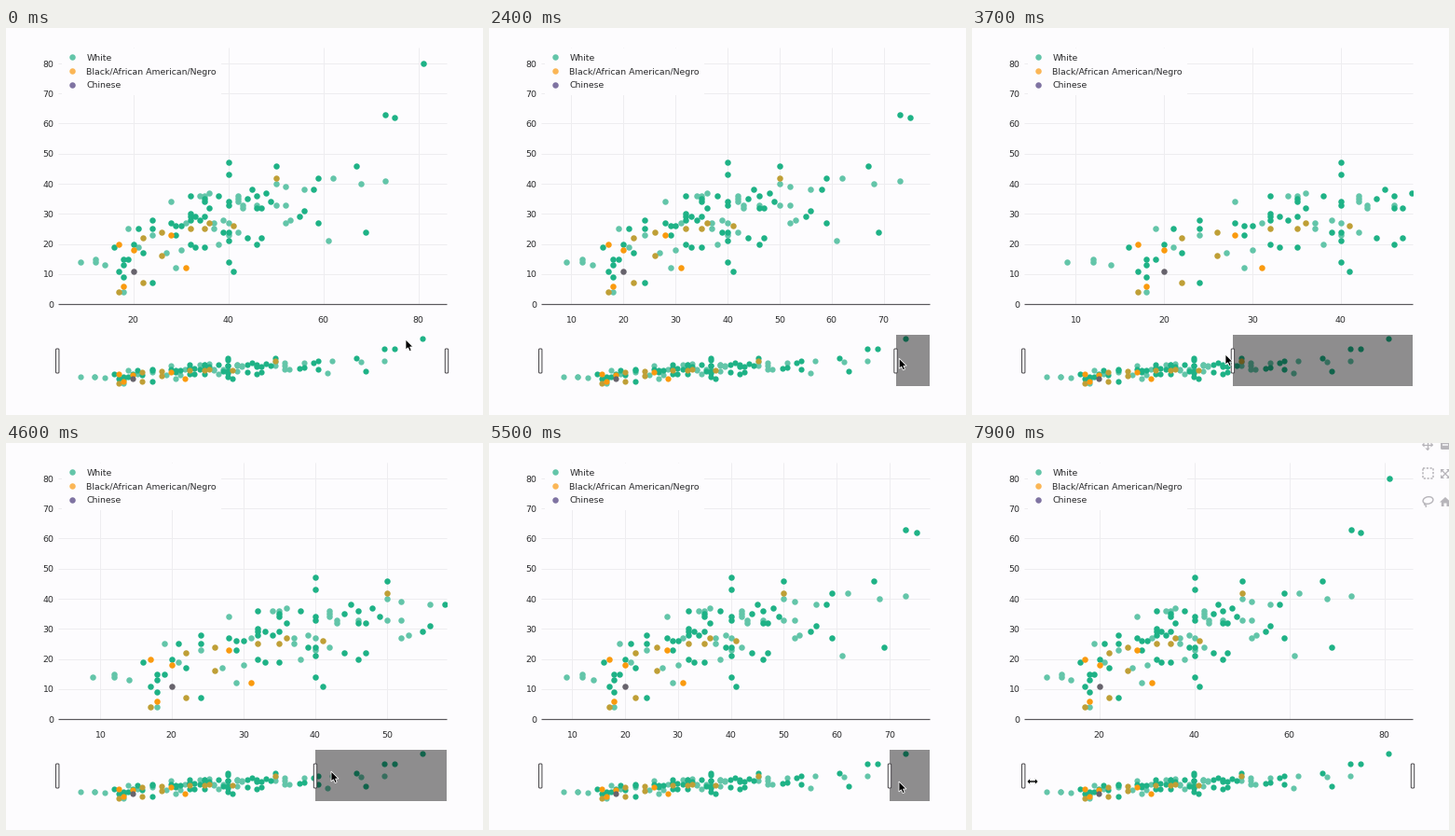
Animation of 512x415 px, one loop 8000 ms. Source, as a matplotlib script:

```python
import numpy as np
import matplotlib.pyplot as plt
from matplotlib.animation import FuncAnimation
from matplotlib.collections import LineCollection
from matplotlib.patches import Ellipse, FancyBboxPatch, Polygon, Rectangle

WIDTH, HEIGHT, DPI = 512, 415, 100
PX = 72 / DPI
FRAMES, STEP_MS = 80, 100
LEFT, RIGHT, TOP, BASE = 56, 473, 21, 296
X_MIN, UNIT_X, UNIT_Y = 4.2, 5.1, 3.225
INK = "#2b2b2d"
PAPER = "#fdfcfe"
LIGHT, DEEP, ORANGE, OLIVE, GREY = "#63c5a9", "#1eb286", "#fa9a0e", "#bf9f36", "#67636c"

# x value -> y values
light = {
    9: [14], 12: [14, 15], 14: [13], 18: [4], 19: [25], 21: [19], 24: [23],
    27: [17], 28: [34], 29: [12], 30: [18], 31: [27], 34: [36], 35: [36],
    36: [37], 37: [25, 27], 38: [20], 39: [28], 40: [27, 23],
    42: [36, 35, 34, 24], 43: [33, 32], 46: [33], 50: [40, 33],
    52: [39, 33, 27], 53: [28], 56: [38], 61: [21], 62: [42], 68: [40], 73: [41],
}
deep_low = {
    16: [19], 17: [11], 18: [15, 13, 9], 19: [15], 20: [20], 21: [25], 22: [17],
    24: [28, 25, 7], 28: [27], 29: [26, 23], 30: [26], 32: [36, 30, 29, 28, 20],
    33: [29, 19], 34: [28], 35: [35, 34, 29, 19], 36: [32], 38: [36], 39: [24],
}
deep_high = {
    40: [47, 43, 34, 33, 24, 21, 14], 41: [11], 44: [35, 22], 45: [38],
    46: [36, 32, 20], 47: [32, 22], 48: [37], 49: [34], 50: [46], 55: [29],
    56: [31], 58: [38], 59: [42, 27], 67: [46], 69: [24], 73: [63], 75: [62], 81: [80],
}
orange = {17: [20], 18: [6], 20: [18], 28: [23], 31: [12]}
olive = {17: [4], 22: [22, 7], 26: [24, 16], 32: [25], 35: [25], 36: [27], 41: [26], 50: [42]}
grey = {20: [11]}


def flatten(groups):
    return np.array([(x, y) for x, ys in groups.items() for y in ys], float)


layers = [(light, LIGHT), (deep_low, DEEP), (deep_high, DEEP),
          (olive, OLIVE), (orange, ORANGE), (grey, GREY)]
layers = [(flatten(groups), color) for groups, color in layers]

fig = plt.figure(figsize=(WIDTH / DPI, HEIGHT / DPI), dpi=DPI, facecolor=PAPER)
ax = fig.add_axes([0, 0, 1, 1])
ax.set_xlim(0, WIDTH)
ax.set_ylim(HEIGHT, 0)
ax.axis("off")


def line(xs, ys, color, width=1, z=1):
    return ax.plot(xs, ys, color=color, lw=width * PX, zorder=z, solid_capstyle="butt")[0]


def label(x, y, text, align, size=9.4):
    return ax.text(x, y, text, ha=align, va="center_baseline", color=INK,
                   fontsize=size * PX, family="DejaVu Sans", zorder=8)


def dots(points, color, diameter=6.5, z=4):
    return ax.scatter(points[:, 0], points[:, 1], s=(diameter * PX) ** 2,
                      c=color, linewidths=0, zorder=z)


# Static chart parts
for value in range(0, 90, 10):
    y = BASE - value * UNIT_Y
    label(51, y, str(value), "right")
    if value:
        line([LEFT, RIGHT], [y, y], "#eeedf0")
line([LEFT, RIGHT], [BASE + .3] * 2, "#5a585c", 1.2, 5)
line([0, WIDTH], [414.5] * 2, "#a3a2a4")

ax.add_patch(Rectangle((60, 22), 171, 50, fc=PAPER, ec="none", zorder=2))
legend = [("White", LIGHT), ("Black/African American/Negro", "#fbb656"), ("Chinese", "#7f73a2")]
for row, (name, color) in enumerate(legend):
    y = 31.3 + 14.7 * row
    dots(np.array([[71, y]]), color, 6.5, 7)
    label(86.5, y, name, "left")

# Scatter layers and their overview copies
plot_area = Rectangle((LEFT, TOP), RIGHT - LEFT, BASE - TOP + 4, transform=ax.transData)
main_dots = []
for points, color in layers:
    main = dots(points, color)
    main.set_clip_path(plot_area)
    main_dots.append(main)
    overview = np.column_stack([LEFT + (points[:, 0] - X_MIN) * UNIT_X - .4,
                                383 - .622 * points[:, 1]])
    dots(overview, color, 6.2)

grid = LineCollection([], colors="#eeedf0", linewidths=PX, zorder=1)
ax.add_collection(grid)
tick_labels = [label(0, 312, "", "center") for _ in range(20)]

mask = Rectangle((RIGHT, 329), 0, 55, fc="black", ec="none", alpha=.44, zorder=5)
ax.add_patch(mask)


def make_handle(center):
    handle = FancyBboxPatch((center - 1.7, 344), 3.4, 26, boxstyle="round,pad=0,rounding_size=1",
                            fc="white", ec="#48464a", lw=PX, zorder=6)
    ax.add_patch(handle)
    return handle


make_handle(55.2)
right_handle = make_handle(RIGHT)

# Toolbar icons
ICON = "#b7b5ba"
toolbar = []


def icon_line(xs, ys, width=1.3, style="-"):
    artist = line(xs, ys, ICON, width, 7)
    artist.set_linestyle(style)
    toolbar.append(artist)


def icon_patch(patch):
    patch.set_zorder(7)
    ax.add_patch(patch)
    toolbar.append(patch)


def arrow_head(x, y, dx, dy, size=2.6):
    tip = (x + dx * size, y + dy * size)
    icon_patch(Polygon([tip, (x - dy * size, y + dx * size), (x + dy * size, y - dx * size)],
                       fc=ICON, ec="none"))


icon_line([484, 494], [2, 2])
icon_line([489, 489], [-3, 7])
for dx, dy in [(1, 0), (-1, 0), (0, 1), (0, -1)]:
    arrow_head(489 + 3.5 * dx, 2 + 3.5 * dy, dx, dy)
icon_patch(FancyBboxPatch((503.5, -2.5), 9, 9, boxstyle="round,pad=0,rounding_size=1",
                          fc=ICON, ec=ICON, lw=PX))
toolbar.append(line([505, 511], [2, 2], PAPER, 1.5, 8))
icon_line([484, 495, 495, 484, 484], [27, 27, 38, 38, 27], 1.5, (0, (1.5, 1)))
icon_line([504, 512], [29, 37])
icon_line([504, 512], [37, 29])
for sx in (-1, 1):
    for sy in (-1, 1):
        x, y = 508 + 5 * sx, 33 + 5 * sy
        icon_patch(Polygon([(x, y), (x - 4 * sx, y), (x, y - 4 * sy)], fc=ICON, ec="none"))
icon_patch(Ellipse((489.5, 61.5), 11, 7.5, angle=-12, fc="none", ec=ICON, lw=1.4 * PX))
icon_line([486, 485.5, 487.5, 487], [64, 66, 67, 69])
icon_patch(Polygon([(502, 63.5), (508, 58), (514, 63.5), (512.5, 63.5), (512.5, 68),
                    (509.5, 68), (509.5, 64.5), (506.5, 64.5), (506.5, 68), (503.8, 68),
                    (503.8, 63.5)], fc=ICON, ec="none"))

# Pointers
ARROW = np.array([(0, 0), (0, 11), (2.5, 8.8), (4.2, 12.6), (6.2, 11.7), (4.6, 8), (8, 8)])
half = np.array([(-6.2, 0), (-2.6, -3.6), (-2.6, -1.1), (2.6, -1.1), (2.6, -3.6)])
RESIZE = np.vstack([half, -half])
pointer = Polygon(ARROW, fc="black", ec="white", lw=.8 * PX, zorder=10)
ax.add_patch(pointer)

# time, pointer x, pointer y
POINTER = np.array([
    (0, 429, 334), (300, 429, 334), (800, 436, 341), (1300, 447, 350), (1800, 459, 356),
    (2000, 472, 357), (2200, 472, 356), (3000, 345, 349), (3700, 272, 350), (4000, 272, 350),
    (4600, 349, 352), (5500, 440, 363), (6300, 473, 365), (6700, 476, 365),
    (7200, 330, 340), (7600, 170, 352), (7900, 65, 363)])
# time, right edge of the selected range
SLIDER = np.array([
    (2150, 473), (3000, 349), (3750, 275), (4100, 275), (4600, 332),
    (5500, 430), (6300, 467.5), (6600, 473)])
TOOLBAR_FADE = np.array([(400, 0), (700, 1), (1300, 1), (1600, 0), (6700, 0), (7000, 1)])


def sample(keys, time, column=1):
    return np.interp(time, keys[:, 0], keys[:, column])


def tick_step(span):
    return 20 if span > 77 else 10 if span > 36 else 5


def update(frame):
    time = frame * STEP_MS
    edge = sample(SLIDER, time)
    span = (edge - LEFT) / UNIT_X
    scale = (RIGHT - LEFT) / span

    for artist, (points, _) in zip(main_dots, layers):
        artist.set_offsets(np.column_stack([LEFT + (points[:, 0] - X_MIN) * scale,
                                            BASE - points[:, 1] * UNIT_Y]))

    step = tick_step(span)
    values = [v for v in range(step, 100, step) if X_MIN <= v <= X_MIN + span]
    places = [LEFT + (v - X_MIN) * scale for v in values]
    grid.set_segments([[(x, TOP), (x, BASE)] for x in places])
    for text in tick_labels:
        text.set_text("")
    for text, value, x in zip(tick_labels, values, places):
        text.set_text(str(value))
        text.set_x(x)

    mask.set_x(edge)
    mask.set_width(RIGHT - edge)
    right_handle.set_x(edge - 1.7)

    for artist in toolbar:
        artist.set_alpha(sample(TOOLBAR_FADE, time))

    shape = RESIZE if time >= 7900 else ARROW
    pointer.set_xy(shape + [sample(POINTER, time, 1), sample(POINTER, time, 2)])
    return []


anim = FuncAnimation(fig, update, frames=FRAMES, interval=STEP_MS,
                     repeat=True, repeat_delay=0, blit=False)
plt.show()
```
